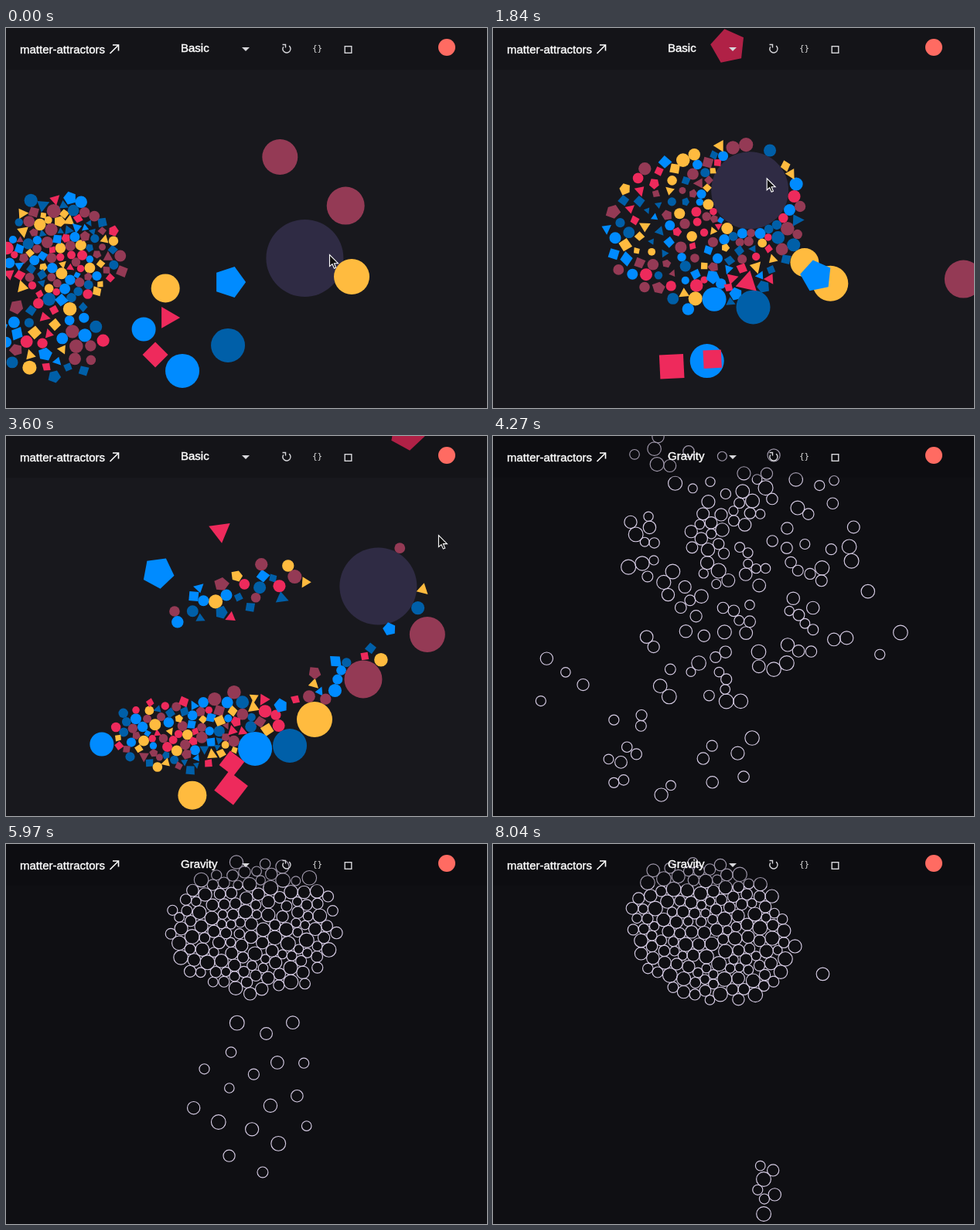
An HTML page with a canvas that plays this animation: 622 by 492 pixels, repeating every 8.08 s.

```html
<!DOCTYPE html>
<html lang="en">
<head>
<meta charset="utf-8">
<title>matter-attractors</title>
<style>
  html, body { margin: 0; width: 100%; height: 100%; overflow: hidden; background: #18181d; }
  canvas { position: absolute; left: 0; top: 0; }
  span {
    position: absolute; color: #fff; white-space: pre;
    font: 15px/20px "Liberation Sans", Arial, sans-serif;
    -webkit-text-stroke: .4px #fff;
  }
  #name { left: 18px; top: 18px; }
  #demo { left: 226px; top: 16px; }
  #code { left: 396px; top: 17px; font: 11px/20px "DejaVu Sans Mono", monospace; -webkit-text-stroke: 0; color: #ddd; }
</style>
</head>
<body>
<canvas id="stage" width="622" height="492"></canvas>
<span id="name">matter-attractors</span>
<span id="demo">Basic</span>
<span id="code">{}</span>
<script>
const W = 622, H = 492, LOOP = 8080, CUT = 3960, LAG = 80, COUNT = 150;
const ctx = document.getElementById('stage').getContext('2d');
const label = document.getElementById('demo');
const colors = { y: '#ffbb3f', r: '#ee2a5c', m: '#943a55', b: '#008bff', n: '#005fa8' };

let seed = 11;
function rnd() {
  seed = (seed * 1664525 + 1013904223) % 4294967296;
  return seed / 4294967296;
}

// Smooth curve through v(0..n-1) at the given times.
function curve(ts, v, t) {
  const n = ts.length;
  const slope = k => {
    const a = Math.max(k - 1, 0), b = Math.min(k + 1, n - 1);
    return (v(b) - v(a)) / (ts[b] - ts[a]);
  };
  if (t >= ts[n - 1]) return v(n - 1) + slope(n - 1) * (t - ts[n - 1]);
  let i = 0;
  while (i < n - 2 && t >= ts[i + 1]) i++;
  const h = ts[i + 1] - ts[i], s = (t - ts[i]) / h, q = s * s, c = q * s;
  return v(i) * (2 * c - 3 * q + 1) + slope(i) * h * (c - 2 * q + s)
       + v(i + 1) * (3 * q - 2 * c) + slope(i + 1) * h * (c - q);
}

// Push overlapping bodies apart; fixed ones stay put.
function separate(list, rounds) {
  for (let k = 0; k < rounds; k++) {
    for (let i = 0; i < list.length; i++) {
      const a = list[i];
      for (let j = i + 1; j < list.length; j++) {
        const b = list[j];
        if (a.fixed && b.fixed) continue;
        const reach = a.pad + b.pad, dx = b.x - a.x, dy = b.y - a.y;
        const d2 = dx * dx + dy * dy;
        if (d2 >= reach * reach) continue;
        const d = Math.sqrt(d2) || .01, push = (reach - d) / d;
        const wa = a.fixed ? 0 : b.fixed ? 1 : .5, wb = b.fixed ? 0 : 1 - wa;
        a.x -= dx * push * wa; a.y -= dy * push * wa;
        b.x += dx * push * wb; b.y += dy * push * wb;
      }
    }
  }
}

// n points spread evenly over a tilted ellipse.
function blob(n, x, y, rx, ry, tilt = 0) {
  const turn = rnd() * 6, cos = Math.cos(tilt), sin = Math.sin(tilt);
  return Array.from({ length: n }, (_, k) => {
    const r = Math.sqrt((k + .5) / n), a = turn + k * 2.39996;
    const u = rx * r * Math.cos(a) + rnd() * 4 - 2, v = ry * r * Math.sin(a) + rnd() * 4 - 2;
    return [x + u * cos - v * sin, y + u * sin + v * cos];
  });
}

// Bodies that flow from one loose formation to the next.
class Swarm {
  constructor(bodies) { this.bodies = bodies; this.times = []; this.poses = []; }
  key(t, ...blobs) {
    const pts = blobs.flat();
    const list = this.bodies.map((b, i) => ({ x: pts[i][0], y: pts[i][1], pad: b.pad }));
    separate(list, 60);
    this.times.push(t);
    this.poses.push(list);
    return this;
  }
  move(t) {
    this.bodies.forEach((b, i) => {
      b.x = curve(this.times, k => this.poses[k][i].x, t);
      b.y = curve(this.times, k => this.poses[k][i].y, t);
    });
  }
}

// Shape and colour, radius, then x,y at each of bigTimes.
const bigTimes = [0, 1100, 2600, 3600];
const big = [
  ['0m', 23, 354, 167, 665, 190, 690, 290, 545, 257],
  ['0m', 24.5, 439, 230, 655, 310, 519, 327, 462, 315],
  ['0y', 23, 447, 322, 471, 333, 397, 332, 399, 367],
  ['0y', 18.5, 206, 337, 406, 296, 353, 337, 241, 465],
  ['0b', 22, 228, 444, 280, 355, 273, 508, 322, 405],
  ['0n', 22, 287, 411, 325, 344, 346, 391, 367, 401],
  ['0b', 15.5, 178, 390, 282, 318, 255, 397, 124, 399],
  ['5b', 21, 289, 329, 429, 327, 361, 297, 197, 177],
  ['4r', 22, 120, 520, 226, 362, 230, 530, 291, 456],
  ['4r', 16.5, 193, 423, 248, 339, 310, 520, 292, 424],
  ['3r', 16, 209, 375, 343, 305, 292, 334, 277, 123],
  ['5r', 23, -40, 90, 181, 9, 415, 44, 519, -4]
].map(([kind, r, ...path]) => ({
  sides: +kind[0], color: colors[kind[1]], r, pad: r * (kind[0] === '0' ? 1 : .85),
  path, fixed: true, turn: 0, spin: .0004
}));

const small = Array.from({ length: COUNT }, (_, i) => {
  const sides = rnd() < .5 ? 0 : 3 + Math.floor(rnd() * 2.9);
  const r = (sides ? 4.8 : 4.3) + 3.2 * rnd() + (i > 85 ? 1.7 : 0);
  return {
    sides, r, pad: r * (sides ? .8 : .98), color: colors['yrmbn'[Math.floor(rnd() * 5)]],
    turn: rnd() * 6, spin: (rnd() - .5) * .004,
    bumps: Array.from({ length: 6 }, () => .85 + rnd() * .25)
  };
});

const basic = new Swarm(small)
  .key(0, blob(95, 75, 295, 76, 60), blob(40, 60, 400, 70, 55), blob(15, 65, 245, 55, 25))
  .key(1100, blob(45, 695, 90, 40, 85), blob(34, 572, 92, 52, 52), blob(42, 450, 210, 62, 55),
    blob(14, 325, 260, 40, 45), blob(15, 420, 275, 75, 18))
  .key(1850, blob(COUNT, 270, 260, 125, 100))
  .key(2600, blob(64, 391, 145, 25, 95), blob(26, 475, 60, 75, 20, -.45), blob(14, 425, 250, 26, 16),
    blob(36, 545, 242, 82, 22, -.15), blob(10, 540, 90, 50, 70))
  .key(3600, blob(84, 220, 387, 82, 45), blob(22, 310, 362, 50, 22), blob(14, 425, 315, 75, 22, -.6),
    blob(26, 300, 205, 98, 28, -.3), blob(4, 505, 190, 22, 50));

const rings = Array.from({ length: COUNT }, () => {
  const r = 6 + 3.6 * rnd();
  return { r, pad: r - .2 };
});
const fall = [
  blob(72, 305, 46, 104, 44, .22), blob(32, 307, 138, 42, 52), blob(8, 335, 225, 38, 38),
  blob(4, 485, 175, 28, 50, .9), blob(34, 185, 400, 160, 18, .56)
].flat();
const start = fall.map(([x, y]) => [x * .3 + (25 + rnd() * 570) * .7, y * .3 + (10 + rnd() * 480) * .7]);
const gravity = new Swarm(rings)
  .key(CUT, start)
  .key(4940, fall)
  .key(5950, blob(132, 320, 110, 105, 80), blob(18, 320, 320, 90, 110))
  .key(7000, blob(112, 250, 130, 114, 64, -.25), blob(22, 395, 163, 55, 24, .45),
    blob(5, 397, 22, 16, 20), blob(11, 345, 345, 115, 62))
  .key(8040, blob(141, 281, 114, 102, 80, .4), blob(7, 352, 446, 10, 42), blob(2, 415, 145, 50, 50, .4));

const mouse = [[-80, 386, 298], [0, 418, 294], [380, 590, 150], [1020, 150, 344], [1100, 148, 348],
  [2150, 430, 150], [2520, 451, 215], [2600, 423, 278], [2950, 330, 400],
  [3520, 481, 195], [3600, 559, 129], [3900, 640, 60]];
const mouseTimes = mouse.map(m => m[0]);
const pointer = t => [1, 2].map(c => curve(mouseTimes, k => mouse[k][c], t));

function disc(x, y, r, color) {
  ctx.fillStyle = color;
  ctx.beginPath();
  ctx.arc(x, y, r, 0, 7);
  ctx.fill();
}

function line(pts, close) {
  ctx.beginPath();
  pts.forEach(([x, y]) => ctx.lineTo(x, y));
  if (close) ctx.closePath();
}

function drawBody(b, t) {
  if (!b.sides) return disc(b.x, b.y, b.r, b.color);
  const pts = [];
  for (let k = 0; k < b.sides; k++) {
    const a = b.turn + b.spin * t + k * 2 * Math.PI / b.sides, r = b.r * (b.bumps ? b.bumps[k] : 1);
    pts.push([b.x + r * Math.cos(a), b.y + r * Math.sin(a)]);
  }
  ctx.fillStyle = b.color;
  line(pts, true);
  ctx.fill();
}

function drawCursor([x, y]) {
  const tip = [[0, 0], [0, 15], [3.5, 12], [6, 17.5], [8.3, 16.5], [6, 11], [11, 11]];
  line(tip.map(p => [x + p[0], y + p[1]]), true);
  ctx.fillStyle = '#111';
  ctx.fill();
  ctx.strokeStyle = '#fff';
  ctx.lineWidth = 1.1;
  ctx.stroke();
}

function drawBasic(t) {
  const [x, y] = pointer(t - LAG);
  const hub = { x, y, r: 50, pad: 50, fixed: true };
  for (const b of big) {
    b.x = curve(bigTimes, k => b.path[2 * k], t);
    b.y = curve(bigTimes, k => b.path[2 * k + 1], t);
  }
  basic.move(t);
  separate([hub, ...big, ...small], 14);
  disc(x, y, 50, '#2f2b44');
  for (const b of [...small, ...big]) drawBody(b, t);
}

function drawGravity(t) {
  gravity.move(t);
  separate(rings, 22);
  ctx.strokeStyle = '#d6cce4';
  ctx.lineWidth = 1.15;
  for (const b of rings) {
    ctx.beginPath();
    ctx.arc(b.x, b.y, b.r - .1, 0, 7);
    ctx.stroke();
  }
}

function drawBar() {
  ctx.fillStyle = 'rgba(8,8,12,.27)';
  ctx.fillRect(0, 0, W, 54);
  ctx.strokeStyle = '#fff';
  ctx.lineWidth = 1.6;
  line([[134.5, 33], [145, 22.5]]);
  ctx.stroke();
  line([[138, 22], [145.5, 22], [145.5, 29.5]]);
  ctx.stroke();
  ctx.fillStyle = '#d8d8dc';
  line([[305, 25], [315, 25], [310, 30]], true);
  ctx.fill();
  ctx.strokeStyle = '#d8d8dc';
  ctx.lineWidth = 1.4;
  ctx.beginPath();
  ctx.arc(363, 27, 5, -.9, 3.7);
  ctx.stroke();
  line([[357.5, 21.5], [361.5, 21.5], [361.5, 25.5]]);
  ctx.stroke();
  ctx.strokeRect(438.2, 23.7, 8.6, 8.6);
  disc(570, 25, 11, '#ff6b62');
}

function draw(t) {
  const first = t < CUT;
  ctx.fillStyle = first ? '#18181d' : '#0f0f13';
  ctx.fillRect(0, 0, W, H);
  (first ? drawBasic : drawGravity)(t);
  drawBar();
  if (first) drawCursor(pointer(t));
  label.textContent = first ? 'Basic' : 'Gravity';
}

const begin = performance.now();
function tick() {
  draw((performance.now() - begin) % LOOP);
  requestAnimationFrame(tick);
}
tick();
</script>
</body>
</html>
```
